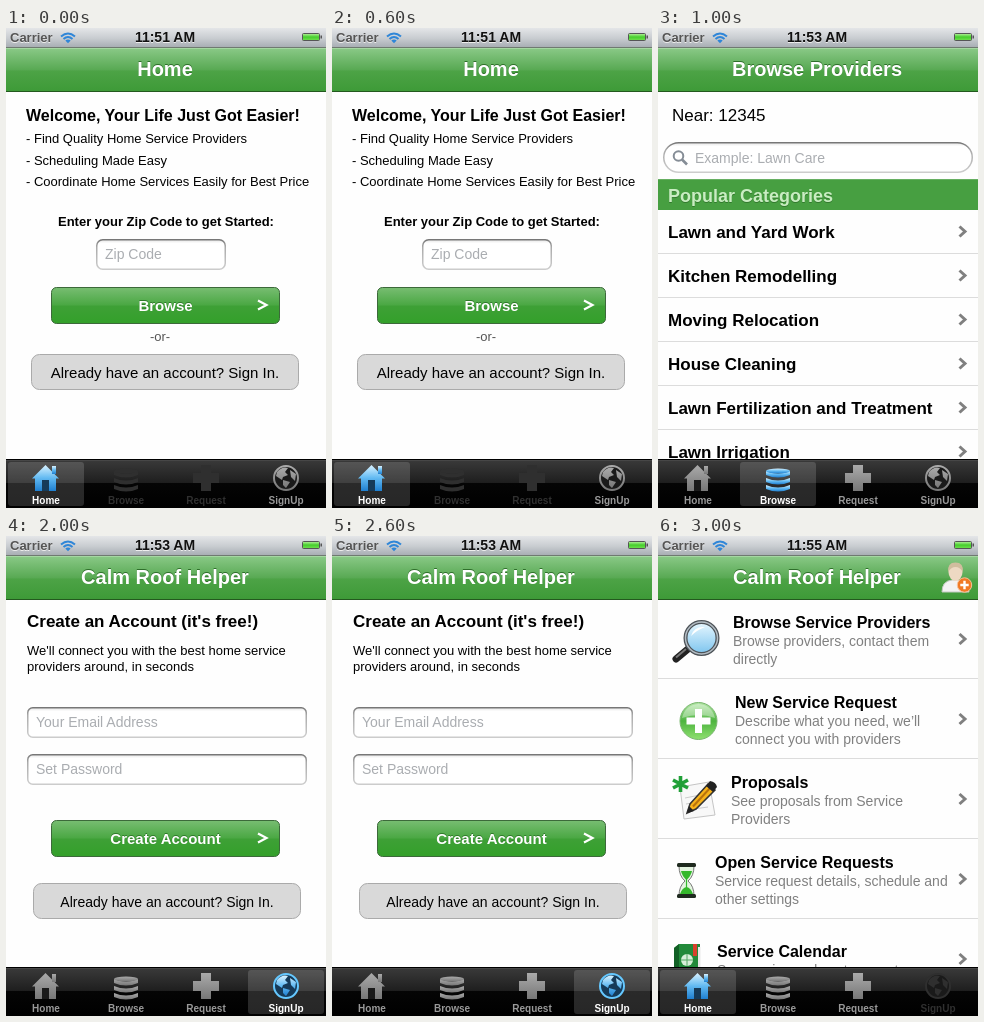
An HTML page for the animation above (4 s loop, 320 by 480 pixels).

```html
<!DOCTYPE html>
<html lang="en">
<head>
<meta charset="utf-8">
<title>Home services app</title>
<style>
  html, body { margin: 0; width: 100%; height: 100%; overflow: hidden; background: #fff; }
  svg { display: block; width: 100vw; height: 100vh; }
  text { font-family: "Liberation Sans", Arial, sans-serif; }
</style>
</head>
<body>
<svg id="stage" viewBox="0 0 320 480"></svg>
<script>
const GREY = '#808080', HINT = '#aaadb1';

const text = (x, y, size, str, fill = '#000', bold = false, anchor = 'start') =>
  `<text x="${x}" y="${y}" font-size="${size}" fill="${fill}" text-anchor="${anchor}"
    ${bold ? 'font-weight="700"' : ''}>${str}</text>`;
const bold = (x, y, size, str, fill) => text(x, y, size, str, fill, true);
const mid = (x, y, size, str, fill, heavy = true) => text(x, y, size, str, fill, heavy, 'middle');
const box = (x, y, w, h, fill, r = 0, extra = '') =>
  `<rect x="${x}" y="${y}" width="${w}" height="${h}" rx="${r}" fill="${fill}" ${extra}/>`;
const disc = (x, y, r, fill, extra = '') => `<circle cx="${x}" cy="${y}" r="${r}" fill="${fill}" ${extra}/>`;
const path = (d, fill, extra = '') => `<path d="${d}" fill="${fill}" ${extra}/>`;
const line = (d, color, w = 1, extra = '') => path(d, 'none', `stroke="${color}" stroke-width="${w}" ${extra}`);

// Vertical gradient; each stop is "offset colour"
const grad = (id, ...stops) => `<linearGradient id="${id}" x2="0" y2="1">` + stops.map(s => {
  const [at, color] = s.split(' ');
  return `<stop offset="${at}" stop-color="${color}"/>`;
}).join('') + '</linearGradient>';

const defs = '<defs>' +
  grad('status', '0 #e4e6e8', '.5 #c9cdd1', '1 #a5abb1') +
  grad('nav', '0 #8ac987', '.5 #58a953', '.52 #4da346', '1 #3d9a37') +
  grad('button', '0 #78bd72', '.48 #4ba844', '.52 #3ea036', '1 #33a02a') +
  grad('rim', '0 #777', '.25 #aaa', '1 #ccc') +
  grad('inset', '0 #e4e4e4', '.12 #fff') +
  grad('tab', '0 #3b3b3b', '.49 #1e1e1e', '.5 #050505', '1 #000') +
  grad('blue', '0 #d9f2ff', '.5 #62baf2', '1 #1f7fd0') +
  grad('grey', '0 #aaa', '1 #777') +
  grad('lens', '0 #e9f8ff', '1 #7cc4ee') +
  grad('ball', '0 #b5e6a8', '.5 #4db43f', '1 #8fe070') +
  grad('battery', '0 #b9f0a0', '.5 #45cf2c', '1 #72df50') +
  '</defs>';

const statusBar = time =>
  box(0, 0, 320, 20, 'url(#status)') + box(0, 19, 320, 1, '#6f7a70') +
  bold(4, 15, 13, 'Carrier', '#eee') + bold(4, 14, 13, 'Carrier', '#555') +
  line('M55 8.5Q62 2.5 69 8.5M57.5 11Q62 7 66.5 11', '#2f86d8', 2) +
  path('M59.3 12.6Q62 10.4 64.7 12.6L62 15.3Z', '#2f86d8') +
  mid(159, 15, 14, time, '#eee') + mid(159, 14, 14, time, '#111') +
  box(296.5, 5.5, 17, 7, 'url(#battery)', 1, 'stroke="#555"') + box(314.5, 7.5, 1.5, 3, '#555');

const navBar = title =>
  box(0, 20, 320, 44, 'url(#nav)') + box(0, 20, 320, 1, '#a5d7a2') + box(0, 63, 320, 1, '#24591f') +
  mid(159, 47, 20, title, '#2f6f2b') + mid(159, 48, 20, title, '#fff');

const tabIcons = [
  (fill, dark) => path('M39.5 437L53 450.5H50V463H29V450.5H26Z', fill) +
    box(46, 438, 4, 8, fill) + box(36, 452, 7, 11, dark),
  fill => [443, 450, 457].map(y =>
    path(`M108 ${y}Q120 ${y + 5} 132 ${y}V${y + 4}Q120 ${y + 9} 108 ${y + 4}Z`, fill)).join('') +
    `<ellipse cx="120" cy="443" rx="12" ry="2.5" fill="${fill}"/>`,
  fill => path('M195 437H205V445H213V455H205V463H195V455H187V445H195Z', fill),
  (fill, dark, on) => disc(280, 450, 12, dark, `stroke="${on ? '#65c8ff' : fill}" stroke-width="2"`) +
    path('M271 444Q276 438 282 440L279 444L282 447L277 449L276 452L270 448ZM284 442L290 446L289 453L285 449ZM277 452L284 454L280 460L277 457Z', fill)
];
const tabNames = ['Home', 'Browse', 'Request', 'SignUp'];

const tabBar = (active, disabled = []) =>
  box(0, 431, 320, 49, 'url(#tab)') + box(0, 431, 320, 1, '#000') + box(0, 432, 320, 1, '#474747') +
  tabNames.map((name, i) => {
    const x = 40 + 80 * i, on = i === active, off = disabled.includes(i);
    const fill = on ? 'url(#blue)' : off ? '#2f2f2f' : 'url(#grey)';
    return (on ? box(x - 38, 434, 76, 44, '#fff', 3, 'fill-opacity=".15"') : '') +
      tabIcons[i](fill, on ? '#163a58' : '#1a1a1a', on) +
      mid(x, 476, 10, name, on ? '#fff' : off ? '#303030' : '#999');
  }).join('');

const field = (x, y, w, h, r) =>
  box(x + .75, y + .75, w - 1.5, h - 1.5, 'url(#inset)', r, 'stroke="url(#rim)" stroke-width="1.5"');
const button = (y, label) =>
  box(45.5, y + .5, 228, 36, 'url(#button)', 5, 'stroke="#3c693a"') +
  mid(159.5, y + 23, 15, label, '#2f7a2a') + mid(159.5, y + 24, 15, label, '#fff') +
  line(`M252 ${y + 13.5}L260.5 ${y + 18}L252 ${y + 22.5}`, '#fff', 2.2);
const signIn = (x, y, size) =>
  box(x + .5, y + .5, 267, 35, '#d9d9d9', 8, 'stroke="#aaa"') +
  mid(x + 134, y + 23.5, size, 'Already have an account? Sign In.', '#000', false);
const chevron = y => line(`M301.5 ${y - 5}L307 ${y}L301.5 ${y + 5}`, '#808080', 3);
const rule = y => box(0, y, 320, 1, '#dcdcdc');

const welcome = () =>
  bold(20, 93, 16, 'Welcome, Your Life Just Got Easier!') +
  ['Find Quality Home Service Providers', 'Scheduling Made Easy',
    'Coordinate Home Services Easily for Best Price']
    .map((s, i) => text(20, 115 + 21.5 * i, 13, '- ' + s)).join('') +
  bold(52, 198, 13, 'Enter your Zip Code to get Started:') +
  field(90, 211, 130, 31, 6) + text(99, 231, 14, 'Zip Code', HINT) +
  button(259, 'Browse') + mid(154, 313, 13, '-or-', '#555', false) + signIn(25, 326, 15);

const browse = () =>
  text(14, 93, 17, 'Near: 12345') + field(5, 114, 310, 31, 15) +
  disc(20.5, 128, 4.8, 'none', 'stroke="#858d96" stroke-width="2"') + line('M24 131.5L29 136.5', '#858d96', 2.6) +
  text(37, 135, 14, 'Example: Lawn Care', HINT) +
  box(0, 151, 320, 31, '#479f41') + box(0, 151, 320, 1, '#67af62') +
  bold(10, 175, 18, 'Popular Categories', '#337a2e') + bold(10, 174, 18, 'Popular Categories', '#c9edc2') +
  ['Lawn and Yard Work', 'Kitchen Remodelling', 'Moving Relocation', 'House Cleaning',
    'Lawn Fertilization and Treatment', 'Lawn Irrigation'].map((s, i) =>
    bold(10, 210 + 44 * i, 17, s) + chevron(203.5 + 44 * i) + rule(225 + 44 * i)).join('');

const signUp = () =>
  bold(21, 91, 17, "Create an Account (it's free!)") +
  text(21, 119, 13, "We'll connect you with the best home service") +
  text(21, 135, 13, 'providers around, in seconds') +
  field(21, 171, 280, 31, 5) + text(30, 191, 14, 'Your Email Address', HINT) +
  field(21, 218, 280, 31, 5) + text(30, 238, 14, 'Set Password', HINT) +
  button(284, 'Create Account') + signIn(27, 347, 14);

const magnifier = () =>
  line('M18 123L30 113', '#222', 7, 'stroke-linecap="round"') + line('M18 121.5L28 113', '#777', 2) +
  disc(43.5, 102, 16, 'url(#lens)', 'stroke="#4d5358" stroke-width="4"') +
  disc(43.5, 102, 16, 'none', 'stroke="#b4bdc4" stroke-width="1.5"') +
  path('M33 100Q36 90 47 91Q39 94 33 100Z', '#fff');

const plusBall = () =>
  disc(40.5, 185, 18.5, 'url(#ball)', 'stroke="#76b56b"') +
  path('M37 173H44V181.5H52.5V188.5H44V197H37V188.5H28.5V181.5H37Z', '#fff') +
  path('M24 182Q27 169 40.5 168Q54 169 57 182Q41 176 24 182Z', '#fff', 'opacity=".35"');

const proposal = () =>
  path('M22 251L51 246L57 279L26 283Z', '#f8f8f8', 'stroke="#c5c5c5"') +
  line('M27 262L47 258M28 268L46 265M29 274L50 271', '#ccc') +
  path('M29 277L32 268L50 248L57 254L38 273Z', '#f6b21a', 'stroke="#333" stroke-width="1.5"') +
  line('M35 270.5L53 251', '#b8720c', 2) +
  path('M29 277L31 270L36 275Z', '#222') + path('M48 250L52 245Q58 246 59 251L55 256Z', '#222') +
  line('M22.5 240V256M15 244L30 252M15 252L30 244', '#21a038', 3.6);

const hourglass = () =>
  path('M21 330H36Q36 340 30 345Q36 350 36 360H21Q21 350 27 345Q21 340 21 330Z', '#e4f5e0', 'stroke="#777"') +
  path('M23 335H34Q33 340 28.5 344Q24 340 23 335ZM22 358Q24 352 28.5 351Q33 352 35 358Z', '#35b82c') +
  line('M28.5 343V353', '#35b82c', 1.2) +
  box(19, 327, 19, 4, '#1f2a1f', 1.5) + box(19, 358, 19, 4, '#1f2a1f', 1.5);

const book = () =>
  path('M16 412L21 408H42V436H16Z', '#228a3a') + path('M16 412L21 408V436H16Z', '#126026') +
  box(40, 411, 2.5, 24, '#e9e9e9') + box(35, 408, 4, 12, '#d8402c') +
  disc(29, 424, 6, '#d7efd9') + line('M23 424H35M29 418V430', '#55a865');

const userBadge = () =>
  path('M284 56Q284 45 294 44H301Q310 45 311 56Z', '#f3f3f3', 'stroke="#c2c9c1"') +
  `<ellipse cx="297.5" cy="36" rx="7" ry="9" fill="#eed9c3"/>` +
  path('M290.3 36Q289 26.5 297.5 26.5Q306 26.5 304.7 36Q302 31 297.5 31Q293 31 290.3 36Z', '#d1bd9e') +
  disc(306.5, 49, 7.2, '#f17a25', 'stroke="#f7c29b"') + line('M302.3 49H310.7M306.5 44.8V53.2', '#fff', 2.4);

const rows = [
  [75, 92, 'Browse Service Providers', 'Browse providers, contact them', 'directly'],
  [77, 172, 'New Service Request', 'Describe what you need, we’ll', 'connect you with providers'],
  [73, 252, 'Proposals', 'See proposals from Service', 'Providers'],
  [57, 332, 'Open Service Requests', 'Service request details, schedule and', 'other settings'],
  [59, 421, 'Service Calendar', 'See service and past requests', '']
];
const menu = () =>
  rows.map(([x, y, title, a, b], i) =>
    bold(x, y, 16, title) + text(x, y + 18, 14, a, GREY) + text(x, y + 36, 14, b, GREY) +
    chevron(103 + 80 * i) + rule(142 + 80 * i)).join('') +
  magnifier() + plusBall() + proposal() + hourglass() + book() + userBadge();

const screen = (time, title, body, ...tabs) =>
  `<g>${box(0, 0, 320, 480, '#fefefe')}${statusBar(time)}${navBar(title)}${body()}${tabBar(...tabs)}</g>`;

const brand = 'Calm Roof Helper';
const stage = document.getElementById('stage');
stage.innerHTML = defs +
  screen('11:51 AM', 'Home', welcome, 0, [1, 2]) +
  screen('11:53 AM', 'Browse Providers', browse, 1) +
  screen('11:53 AM', brand, signUp, 3) +
  screen('11:55 AM', brand, menu, 0, [3]);

const screens = [...stage.querySelectorAll('g')];
const start = performance.now();
function show(now) {
  const current = Math.floor(Math.max(0, now - start) / 1000) % screens.length;
  screens.forEach((g, i) => g.style.display = i === current ? '' : 'none');
  requestAnimationFrame(show);
}
show(start);
</script>
</body>
</html>
```
